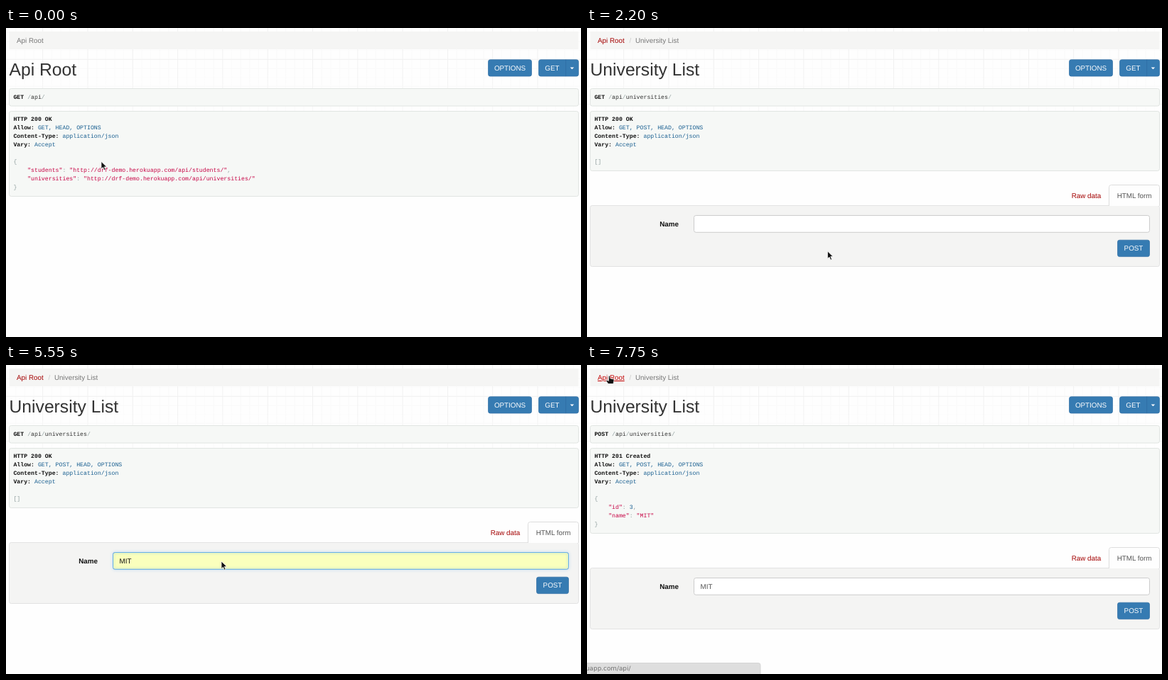
Recreate the animation shown at these times as an HTML page. Size 809x436 px, loop 8 s.

```html
<!DOCTYPE html>
<html lang="en">
<head>
<meta charset="utf-8">
<title>Browsable API</title>
<style>
  html, body { margin: 0; width: 100%; height: 100%; overflow: hidden; background: #fefefe; }
  svg { display: block; }
  text { font: 9.84px "Liberation Sans", Arial, sans-serif; fill: #333; white-space: pre; text-rendering: geometricPrecision; }
  .title { font-size: 24.7px; }
  .code { font: 8.22px "Liberation Mono", monospace; }
  .native { font: 8.85px "DejaVu Sans", sans-serif; fill: #111; }
  .bold { font-weight: bold; fill: #111; }
  .lit { fill: #195f91; }
  .str { fill: #c70445; }
  .pun { fill: #93a1a1; }
  .muted { fill: #777; }
  .entry { fill: #555; }
  .link { fill: #a30000; }
  .hover { text-decoration: underline; text-decoration-thickness: .8px; text-underline-offset: 1px; }
  .link.hover { fill: #c20000; }
  .white { fill: #fff; }
  .slash { fill: #ccc; }
  .button { fill: #367bb2; stroke: #2e6da4; stroke-width: .7; }
  .pre { fill: #f6f8f6; stroke: #e1e5e2; }
  .well { fill: #f4f4f3; stroke: #e3e3e3; }
  .input { stroke: #ccc; }
  .focus { fill: none; stroke: #66afe9; filter: drop-shadow(0 0 2px rgba(102, 175, 233, .75)); }
</style>
</head>
<body>
<svg width="809" height="436" viewBox="0 0 809 436">
  <defs>
    <linearGradient id="fade" x2="0" y2="1">
      <stop stop-color="#fff"/><stop offset=".5" stop-color="#fff"/><stop offset="1" stop-color="#777"/>
    </linearGradient>
    <mask id="gridMask"><rect width="809" height="122" fill="url(#fade)"/></mask>
    <path id="arrow" d="M0 0V10.4L2.5 8.2L4.2 12.2L6 11.4L4.3 7.5H7.6Z" fill="#111" stroke="#fff" stroke-width=".7"/>
    <path id="hand" d="M-1.1 .4Q0 -.8 1 .4V3.4L5.4 4.4Q6.6 4.8 6.4 6.2L5.5 11H-1.6L-4.4 7.3Q-4.6 5.8 -3.2 6.1L-1.1 7Z" fill="#111" stroke="#fff" stroke-width=".6"/>
    <g id="ibeam" fill="none">
      <path d="M-2.6 -5H-.6L0 -4.4L.6 -5H2.6M0 -4.4V4.7M-2.6 5.3H-.6L0 4.7L.6 5.3H2.6" stroke="#fff" stroke-width="2.2"/>
      <path d="M-2.6 -5H-.6L0 -4.4L.6 -5H2.6M0 -4.4V4.7M-2.6 5.3H-.6L0 4.7L.6 5.3H2.6" stroke="#333" stroke-width="1.1"/>
    </g>
  </defs>
  <g id="grid" mask="url(#gridMask)" fill="none"></g>
  <g id="page"></g>
  <use id="cursor"/>
</svg>
<script>
const LOOP = 8000, STEP = 50, LINE = 12;
const $ = id => document.getElementById(id);

// Pointer path: time, x, y
const path = [
  [0, 134, 188.4], [700, 214.5, 214], [1200, 214.5, 214], [1250, 275, 214], [1550, 275, 214],
  [2050, 338.5, 315], [2400, 338.5, 315], [2550, 339.5, 319], [2900, 304, 274],
  [3050, 304.5, 278.5], [5400, 304.5, 278.5], [5450, 303, 277], [6150, 303, 277],
  [6200, 304.5, 278.5], [6950, 304.5, 278.5], [7000, 282.5, 261.5], [7250, 38, 18],
  [7350, 38, 18], [7600, 31.5, 15.5]
];

const text = (x, y, body, cls = '', extra = '') => `<text x="${x}" y="${y}" class="${cls}" ${extra}>${body}</text>`;
const rect = (x, y, w, h, cls, r = 2.8) => `<rect x="${x}" y="${y}" width="${w}" height="${h}" rx="${r}" class="${cls}"/>`;
const fill = (x, y, w, h, color) => `<rect x="${x}" y="${y}" width="${w}" height="${h}" fill="${color}"/>`;
const span = (cls, body) => `<tspan class="${cls}">${body}</tspan>`;
const button = (x, y, w, label) => rect(x, y, w, 23.4, 'button') +
  text(x + w / 2, y + 15.2, label, 'white', 'text-anchor="middle"');
const caret = x => fill(x, 270.5, .8, 11, '#333');

function drawGrid() {
  const cell = 12.66;
  let minor = '', major = '';
  for (let i = -4; i < 61; i++) {
    const line = `M${(51.7 + i * cell).toFixed(1)} 0V122`;
    i % 5 ? minor += line : major += line;
  }
  for (let i = -3; i < 7; i++) {
    const line = `M0 ${(44.3 + i * cell).toFixed(1)}H809`;
    i % 5 ? minor += line : major += line;
  }
  $('grid').innerHTML = `<path d="${minor}" stroke="#f9f9f9" stroke-width=".8"/><path d="${major}" stroke="#f1f1f1"/>`;
}

function header(title, hovered) {
  const crumbs = title === 'Api Root'
    ? text(15, 21, title, 'muted')
    : text(15, 21, 'Api Root', 'link ' + (hovered ? 'hover' : '')) + text(59.5, 21, '/', 'slash') + text(68, 21, title, 'muted');
  return fill(4.5, 5, 801, 25, '#f5f5f4') + crumbs + text(4.5, 66.8, title, 'title') +
    button(678.5, 44.7, 61, 'OPTIONS') + button(749.5, 44.7, 56, '') +
    text(758.3, 59.9, 'GET', 'white') + fill(787.3, 44.7, .8, 23.4, '#2e6da4') +
    '<path d="M793.6 55.4h5.6l-2.8 2.8z" fill="#fff"/>';
}

function request(method, parts, ready) {
  const slash = ready ? span('pun', '/') : '/';
  return rect(4.5, 85.5, 801, 24.5, 'pre') +
    text(10.4, 99.7, span('bold', method) + ' ' + slash + parts.map(part => part + slash).join(''), 'code');
}

function response(status, allow, json) {
  const field = (key, value) => span('bold', key + ':') + ' ' + span('lit', value);
  const lines = [span('bold', status), field('Allow', allow), field('Content-Type', 'application/json'),
    field('Vary', 'Accept'), '', ...json];
  return rect(4.5, 117.5, 801, lines.length * LINE + 12, 'pre') +
    lines.map((line, i) => text(10.4, 131.2 + i * LINE, line, 'code')).join('');
}

function form(ready, input) {
  const tab = text(745.7, 240.3, 'HTML form', ready ? 'entry' : 'link');
  const well = rect(4.5, 250.5, 801, ready ? 86 : 28, 'well');
  const raw = text(681.7, 240.3, 'Raw data', 'link');
  if (!ready) return well + raw + tab;
  return well + raw +
    '<path d="M734.5 251V224.5q0-3 3-3H802.5q3 0 3 3V251" fill="#fefefe" stroke="#ddd"/>' + tab +
    text(129, 280, 'Name', 'bold', 'text-anchor="end"') + button(746.5, 299.2, 45, 'POST') + input;
}

const box = color => `<rect x="150.5" y="264.5" width="641" height="23.8" rx="2.8" fill="${color}" class="input"/>`;

function nameInput(t) {
  const filled = t >= 4250;
  let out = box(filled ? '#faffbd' : '#fff');
  if (t >= 3350) {
    const glow = Math.min(1, (t - 3300) / 150);
    out += `<g opacity="${glow}">${rect(150.5, 264.5, 641, 23.8, 'focus')}</g>`;
  }
  if (filled) out += text(159.6, 280, 'MIT', '', 'style="fill:#111"');
  else if (t >= 3650) out += text(159.6, 280, 'M', 'entry');
  if (t >= 3350 && t < 3650) out += caret(159.6);
  if (t >= 3650 && t < 4250) out += caret(167.8);
  if (t >= 4600 && t < 5150) out += caret(176);
  if (t >= 3650 && t < 4700) {
    const opacity = Math.min(1, (4700 - t) / 200);
    out += `<g opacity="${opacity}"><rect x="150.5" y="288.8" width="641" height="34.4" fill="#fff" stroke="#b8b8b8"/>` +
      (filled ? fill(151, 289.3, 640, 17, '#cdcdcd') : '') +
      text(153.3, 300.4, 'MIT', 'native') + text(153.3, 317.4, 'Maredo Brisnavel', 'native') + '</g>';
  }
  return out;
}

function statusBar(address, strong) {
  return '<path d="M-1 420.5H241q3 0 3 3V437H-1z" fill="#dedede" stroke="#d0d0d0" stroke-width=".8"/>' +
    text(-2, 431.3, address, 'native', `style="fill:${strong ? '#707070' : '#aaa'}"`);
}

function rootPage(t, y) {
  const entry = (key, from, end) => {
    const on = y >= from && y < from + LINE && t >= 50;
    const url = `http://drf-demo.herokuapp.com/api/${key}/`;
    return '    ' + span('str', `"${key}"`) + span('pun', ':') + ' ' +
      span('str', '"') + span(on ? 'str hover' : 'str', url) + span('str', '"') + span('pun', end);
  };
  const json = [span('pun', '{'), entry('students', 195, ','), entry('universities', 207, ''), span('pun', '}')];
  return header('Api Root') + request('GET', ['api'], true) + response('HTTP 200 OK', 'GET, HEAD, OPTIONS', json) +
    (t >= 850 && t < 1750 ? statusBar('uapp.com/api/universities/', t >= 950) : '');
}

function listPage(t) {
  const ready = t >= 2200;
  return header('University List') + request('GET', ['api', 'universities'], ready) +
    response('HTTP 200 OK', 'GET, POST, HEAD, OPTIONS', [ready ? span('pun', '[]') : '[]']) +
    form(ready, nameInput(t));
}

function createdPage(t) {
  const ready = t >= 6350;
  const tint = (cls, body) => ready ? span(cls, body) : body;
  const pair = (key, value, end) => '    ' + tint('str', `"${key}"`) + tint('pun', ':') + ' ' + value + tint('pun', end);
  const json = [tint('pun', '{'), pair('id', tint('lit', '3'), ','), pair('name', tint('str', '"MIT"'), ''), tint('pun', '}')];
  return header('University List', t >= 7250) + request('POST', ['api', 'universities'], ready) +
    response('HTTP 201 Created', 'GET, POST, HEAD, OPTIONS', json) +
    `<g transform="translate(0 36)">${form(ready, box('#fff') + text(159.6, 280, 'MIT', 'entry'))}</g>` +
    (t >= 7650 ? statusBar('uapp.com/api/', t >= 7750) : '');
}

function pointer(t) {
  const i = path.findIndex(point => point[0] > t);
  if (i < 0) return path[path.length - 1].slice(1);
  const [t0, x0, y0] = path[i - 1], [t1, x1, y1] = path[i];
  const k = (t - t0) / (t1 - t0), ease = k * k * (3 - 2 * k);
  return [x0 + (x1 - x0) * ease, y0 + (y1 - y0) * ease];
}

function cursorKind(t, y) {
  if (t < 2000) return y >= 195 && y < 219 ? 'hand' : 'arrow';
  if (t < 5450) return y < 288 ? 'ibeam' : 'arrow';
  if (t < 6200) return 'arrow';
  if (t < 7150) return 'ibeam';
  return t < 7250 ? 'arrow' : 'hand';
}

function draw(t) {
  const [x, y] = pointer(t);
  $('page').innerHTML = t < 2000 ? rootPage(t, y) : t < 6150 ? listPage(t) : createdPage(t);
  $('cursor').setAttribute('href', '#' + cursorKind(t, y));
  $('cursor').setAttribute('transform', `translate(${x.toFixed(1)} ${y.toFixed(1)})`);
}

const start = performance.now();
let shown = -1;
function tick() {
  const t = Math.floor((performance.now() - start) % LOOP / STEP) * STEP;
  if (t !== shown) draw(shown = t);
  requestAnimationFrame(tick);
}

drawGrid();
tick();
</script>
</body>
</html>
```
